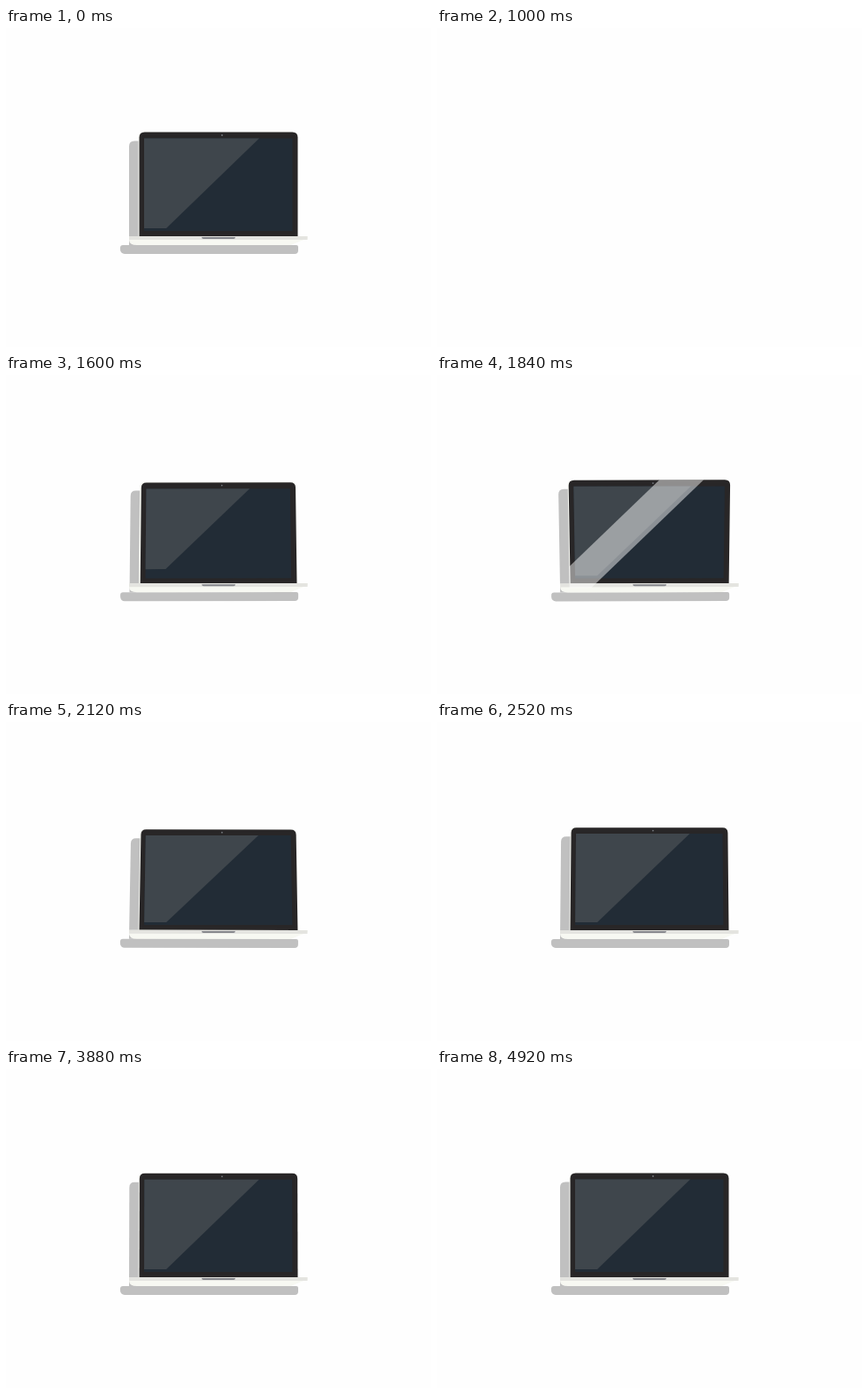
An HTML page with a canvas that plays this animation: 480x360 px, repeating every 6.92 s.

```html
<!DOCTYPE html>
<html lang="en">
<head>
<meta charset="utf-8">
<title>Laptop opening</title>
<style>
html, body { margin: 0; width: 100%; height: 100%; overflow: hidden; background: #fefefe; }
canvas { display: block; width: 480px; height: 360px; }
</style>
</head>
<body>
<canvas id="stage" width="480" height="360"></canvas>
<script>
const ctx = document.getElementById('stage').getContext('2d');
const LOOP = 6920, STEP = 40, START = 1, END = 4.92;
const HINGE = { x: 240, y: 235 };
const EYE = { x: 240, y: 180, depth: 1100 };
const COLOR = {
  paper: '#fefefe', shadow: '#c0c0c0', shell: '#f7f8f2', strip: '#e4e4e0',
  bezel: '#282627', screen: '#222c36', glare: '#3f464c', notch: '#85868b'
};

const clamp = v => Math.min(1, Math.max(0, v));
const progress = (t, from, length) => clamp((t - from) / length);
const easeOut = p => 1 - (1 - p) ** 3;
const smooth = p => p * p * (3 - 2 * p);
const damped = (t, decay, period) => Math.exp(-decay * t) * Math.cos(2 * Math.PI * t / period);

// Returns a mapping for the lid plane, tilted about the hinge (positive leans back).
function lidPlane(tilt, scale) {
  const sin = Math.sin(tilt), cos = Math.cos(tilt);
  return (x, y) => {
    const rise = (HINGE.y - y) * scale;
    const k = 1 / (1 + rise * sin / EYE.depth);
    return [
      EYE.x + (HINGE.x + (x - HINGE.x) * scale - EYE.x) * k,
      EYE.y + (HINGE.y - rise * cos - EYE.y) * k
    ];
  };
}

// Each layer of the lid grows from growAt and swings open from openAt.
function layerPlane(t, moving, growAt, openAt) {
  if (!moving) return lidPlane(0, 1);
  const opening = -88 * (1 - smooth(progress(t, openAt, 0.32)));
  const wobble = 12.2 * damped(t - 2.12, 1, 0.44);
  return lidPlane((opening + wobble) * Math.PI / 180, easeOut(progress(t, growAt, 0.4)));
}

function polygon(plane, points) {
  ctx.beginPath();
  points.forEach(([x, y]) => ctx.lineTo(...plane(x, y)));
  ctx.closePath();
}

// A panel with round upper corners.
function panel(plane, left, top, right, bottom, r) {
  const to = (x, y) => ctx.lineTo(...plane(x, y));
  const bend = (cx, cy, x, y) => ctx.quadraticCurveTo(...plane(cx, cy), ...plane(x, y));
  ctx.beginPath();
  to(left, bottom);
  to(left, top + r);
  bend(left, top, left + r, top);
  to(right - r, top);
  bend(right, top, right, top + r);
  to(right, bottom);
  ctx.closePath();
}

function fill(color) {
  ctx.fillStyle = color;
  ctx.fill();
}

function drawLid(t, moving) {
  const shell = layerPlane(t, moving, 1.267, 1.24);
  const bezel = layerPlane(t, moving, 1.292, 1.252);
  const screen = layerPlane(t, moving, 1.3, 1.265);
  const glareSize = moving ? easeOut(progress(t, 1.368, 0.4)) : 1;

  if (!moving || t > 1.267) {
    ctx.save();
    ctx.translate(-10.5, 10);
    panel(shell, 149.5, 117.5, 329.5, 235, 6);
    fill(COLOR.shadow);
    ctx.restore();
    panel(shell, 149.5, 117.5, 329.5, 235, 6);
    fill(COLOR.shell);
  }
  if (!moving || t > 1.292) {
    panel(bezel, 150.5, 117.5, 329.5, 235, 6);
    fill(COLOR.bezel);
    ctx.beginPath();
    ctx.arc(...bezel(244, 121), 0.9 * glareSize, 0, 7);
    fill('#777b80');
  }
  if (!moving || t > 1.3) {
    polygon(screen, [[156, 124.5], [323.5, 124.5], [323.5, 229], [156, 229]]);
    fill(COLOR.screen);
    const grow = (x, y) => [156 + (x - 156) * glareSize, 124.5 + (y - 124.5) * glareSize];
    polygon(screen, [grow(156, 124.5), grow(286, 124.5), grow(181, 226), grow(156, 226)]);
    fill(COLOR.glare);
  }
}

function drawShine(t) {
  const sweep = (t - 1.68) / 0.36;
  if (sweep <= 0 || sweep >= 1) return;
  const middle = 116.5 + 360 * sweep;
  const edge = (offset, y) => [middle + offset - 1.045 * (y - 118), y];
  ctx.save();
  panel(layerPlane(t, true, 1.267, 1.24), 149.5, 117.5, 330, 240, 6);
  ctx.clip();
  polygon((x, y) => [x, y], [edge(-25, 110), edge(25, 110), edge(25, 245), edge(-25, 245)]);
  fill('rgba(255,255,255,.48)');
  ctx.restore();
}

function drawBaseShadow() {
  ctx.beginPath();
  ctx.roundRect(129, 245, 201, 10, [3, 2, 4, 5]);
  fill(COLOR.shadow);
}

function drawBase() {
  ctx.fillStyle = COLOR.shell;
  ctx.fill(new Path2D('M139 235H340.5V237.5L331 241L322 245H148Q139 245 139 239Z'));
  ctx.fillStyle = COLOR.strip;
  ctx.fillRect(139, 235, 201.5, 4);
  ctx.fillStyle = COLOR.notch;
  ctx.beginPath();
  ctx.roundRect(221, 236, 38, 2, [0, 0, 2, 2]);
  ctx.fill();
}

function draw(ms) {
  const t = Math.floor(ms / STEP) * STEP / 1000;
  const moving = t >= START && t < END;
  ctx.fillStyle = COLOR.paper;
  ctx.fillRect(0, 0, 480, 360);
  if (t === START) return;

  ctx.save();
  if (moving) {
    const sway = damped(t - 1.04, 5, 0.72);
    const pop = easeOut(progress(t, START, 0.25));
    ctx.translate(240, 180 + 15 * sway);
    ctx.rotate(-9 * sway * Math.PI / 180);
    ctx.translate(0, 60);
    ctx.scale(pop, pop);
    ctx.translate(-240, -240);
  }
  drawBaseShadow();
  drawLid(t, moving);
  drawBase();
  if (moving) drawShine(t);
  ctx.restore();
}

const began = performance.now();
function tick() {
  draw((performance.now() - began) % LOOP);
  requestAnimationFrame(tick);
}
tick();
</script>
</body>
</html>
```
